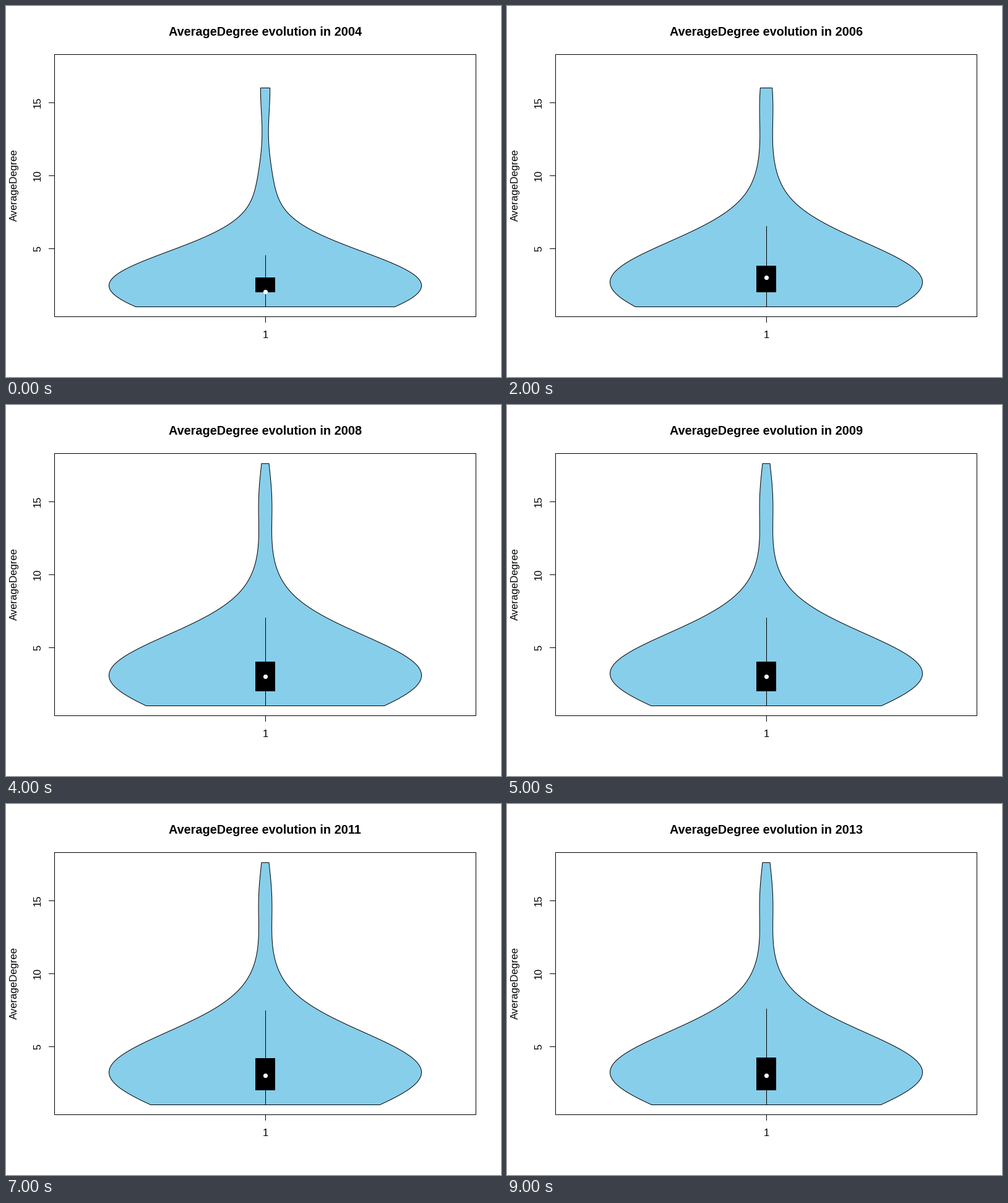
Write a matplotlib script that moves like this. It is 800 px wide and 600 px high and loops after 10 s.

```python
import numpy as np
import matplotlib.pyplot as plt
from matplotlib.animation import FuncAnimation
from matplotlib.patches import Circle, Polygon, Rectangle

PX = 0.72  # points per pixel at 100 dpi
MID, HALF = 419, 252.5
FIRST, YEARS = 2004, 10
Q1 = 2
plt.rcParams["font.family"] = "Liberation Sans"


def ypx(value):
    return 510.1 - 23.6 * value


def row(value):
    return int(ypx(value))


def bell(v, mean, sd):
    return np.exp(-((v - mean) / sd) ** 2 / 2)


def quartile(i):
    return np.interp(i, [0, 1, 2, 3, 5, 7, 9], [3, 3.46, 3.81, 4, 4, 4.17, 4.22])


def median(i):
    return np.interp(i, [0, 1, 2], [2, 2.9, 3])


def outline(i):
    """Violin of a main bell, a shoulder and a thin tail."""
    t = min(i / 5.5, 1)
    mean = 2.45 + 0.77 * t * t * (3 - 2 * t)
    v = np.linspace(1, 16 if i < 3 else 17.6, 100)
    if i < 2:
        density = bell(v, mean, 2.37) + 0.045 * bell(v, 9, 2.2) + 0.03 * bell(v, 16, 2.2)
    else:
        density = bell(v, mean, 2.82) + 0.035 * bell(v, 9.5, 2.2) + 0.041 * bell(v, 15, 2.5)
    half = HALF * density / density.max()
    left = np.column_stack([MID - half, ypx(v)])
    right = np.column_stack([MID + half, ypx(v)])
    return np.vstack([left, right[::-1]])


fig = plt.figure(figsize=(8, 6), dpi=100, facecolor="white")
ax = fig.add_axes([0, 0, 1, 1])
ax.set_xlim(0, 800)
ax.set_ylim(600, 0)
ax.axis("off")


def line(xs, ys):
    return ax.plot(xs, ys, color="black", lw=PX, snap=True,
                   solid_capstyle="projecting", solid_joinstyle="miter")[0]


def label(x, y, s, size=16.5, **kw):
    return ax.text(x, y, s, fontsize=size * PX, ha="center", va="baseline",
                   rotation_mode="anchor", **kw)


violin = ax.add_patch(Polygon(outline(0), closed=True, fc="skyblue", ec="black",
                              lw=PX, zorder=1))
whisker = line([MID, MID], [row(1), row(4.5)])
box = ax.add_patch(Rectangle((403, row(3)), 31, 23, fc="black", ec="black", lw=PX,
                             snap=True, zorder=3))
dot = ax.add_patch(Circle((MID + 0.5, row(2) + 0.5), 3.6, fc="white", ec="none", zorder=4))

line([78, 759, 759, 78, 78], [78, 78, 502, 502, 78])
line([MID, MID], [502, 511])
label(MID, 537, "1")
for v in (5, 10, 15):
    line([69, 78], [row(v)] * 2)
    label(56, row(v), str(v), rotation=90)
label(18, 289.5, "AverageDegree", size=16.6, rotation=90)
title = label(MID - 0.3, 48, "", size=19.9, weight="bold")


def update(i):
    q3 = quartile(i)
    title.set_text(f"AverageDegree evolution in {FIRST + i}")
    violin.set_xy(outline(i))
    box.set_y(row(q3))
    box.set_height(row(Q1) - row(q3))
    whisker.set_ydata([row(1), row(q3 + 1.5 * (q3 - Q1))])
    dot.center = (MID + 0.5, row(median(i)) + 0.5)
    return title, violin, box, whisker, dot


anim = FuncAnimation(fig, update, frames=YEARS, interval=1000, repeat=True,
                     repeat_delay=0, blit=False)
plt.show()
```
